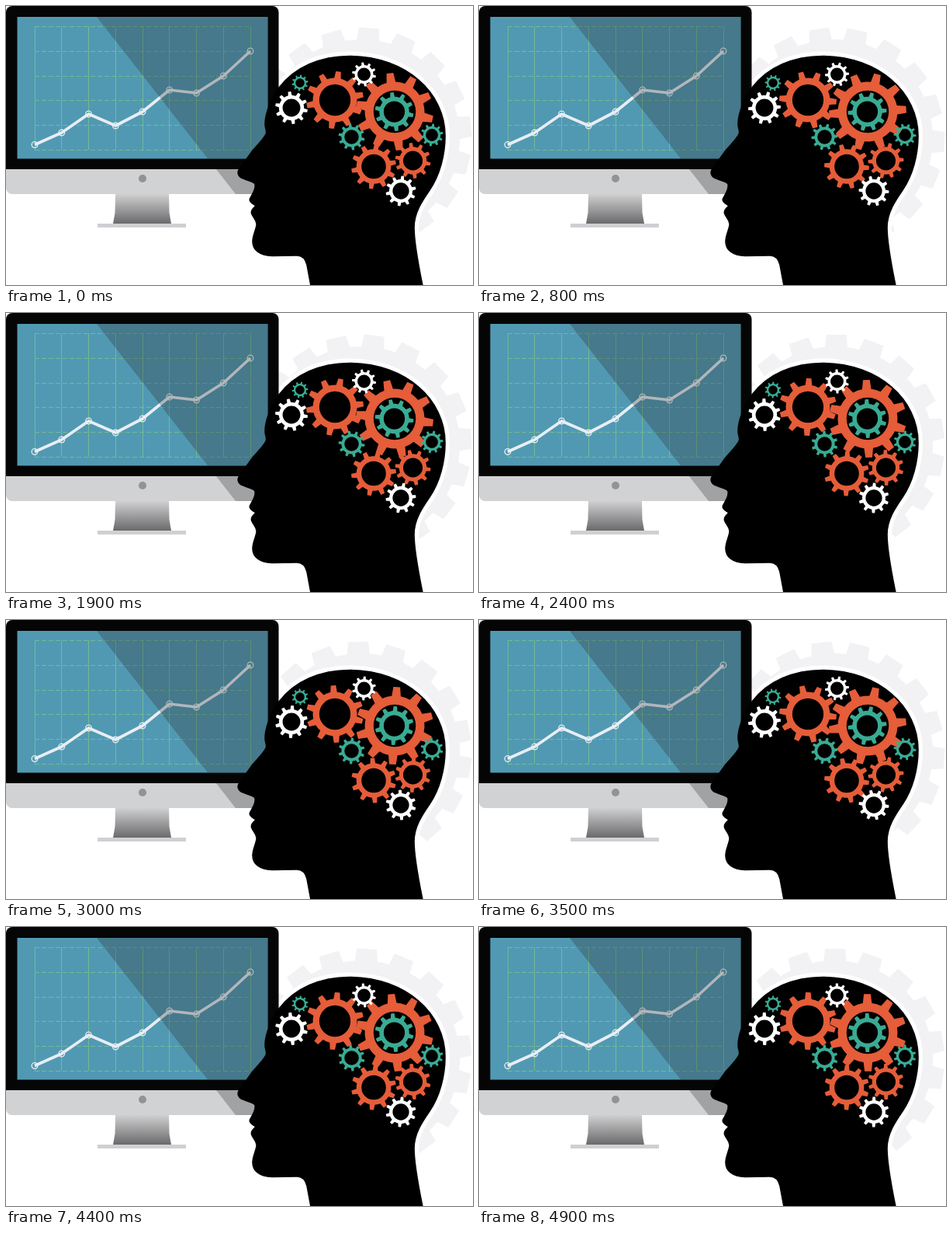
These frames come from a looping animation (602x359 px, 5 s). An HTML page with a canvas:

```html
<!DOCTYPE html>
<html lang="en">
<head>
<meta charset="utf-8">
<title>Thinking gears</title>
<style>
html, body { margin: 0; width: 100%; height: 100%; overflow: hidden; background: #fff; }
canvas { display: block; }
</style>
</head>
<body>
<canvas id="stage" width="602" height="359"></canvas>
<script>
const ctx = document.getElementById('stage').getContext('2d');
const TICK = 100, TICKS = 50;
const RESTS = [12, 31, 37]; // ticks that repeat the pose before them
const PITCHES = 8;          // teeth passed per loop
const TAU = Math.PI * 2, DEG = TAU / 360;
const ORANGE = '#e55d39', TEAL = '#3aab93', WHITE = '#fff', PALE = '#f2f1f4';
const SCREEN = [14.5, 14, 323, 182.5];
const CHIN = [0, 210, 351.5, 32, [0, 0, 8, 8]];

// x, y, radius, colour, direction
const GEARS = [
  [424, 121, 37, ORANGE, 1],
  [501, 136, 50, ORANGE, -1],
  [500.5, 136, 25, TEAL, -1],
  [474, 206.5, 29, ORANGE, 1],
  [524.5, 199, 23, ORANGE, -1],
  [368, 131, 21, WHITE, -1],
  [461.5, 88, 15.5, WHITE, -1],
  [379, 99, 10.5, TEAL, 1],
  [445.5, 168.5, 17, TEAL, -1],
  [549, 166, 14.5, TEAL, 1],
  [509, 238, 19.5, WHITE, 1]
];

const HEIGHTS = [178.5, 163, 139, 154, 136, 108, 112, 90, 58];
const column = i => 37 + i * 34.75;

const head = new Path2D(`M445 64.5 C405 64 372 79 352 105 C341 120 334 139 334 152
  C334 158 337 161 335 165 C332 171 325 178 318 186 L301 209.5
  C297 215 300 220 306 222 C312 225 319 226 321 229
  C322 235 319 240 315 247 C313 250 315 253 322 257
  C318 261 315 264 317 268 C319 273 324 276 323 282
  C322 289 318 295 318 303 C318 314 327 321 343 321.5
  L373 321 C382 320 386 325 388 333 L393 360 L537 360
  C532 335 526 306 526 285 C526 266 537 250 546 237
  C559 218 566 192 566 167 C566 111 515 65.5 445 64.5 Z`);

// Steady turning with one slow swell over the loop
function travel(tick) {
  const part = tick / TICKS;
  return PITCHES * part + 0.14 * Math.sin(TAU * part);
}

function gearPath(x, y, tip, root, turn, teeth, wide, narrow) {
  const pitch = TAU / teeth;
  const at = (r, a) => ctx.lineTo(x + r * Math.sin(a), y - r * Math.cos(a));
  ctx.beginPath();
  for (let i = 0; i < teeth; i++) {
    const a = turn + i * pitch;
    at(root, a - wide * pitch);
    at(tip, a - narrow * pitch);
    at(tip, a + narrow * pitch);
    at(root, a + wide * pitch);
    at(root, a + pitch / 2);
  }
  ctx.closePath();
}

function drawGear([x, y, r, color, dir], move) {
  gearPath(x, y, r, r * 0.77, dir * (7 + 36 * move) * DEG, 10, 0.24, 0.14);
  const hole = r * 0.545;
  ctx.moveTo(x + hole, y);
  ctx.arc(x, y, hole, 0, TAU);
  ctx.fillStyle = color;
  ctx.fill('evenodd');
}

function fillShape(color, points) {
  ctx.beginPath();
  points.forEach(p => ctx.lineTo(p[0], p[1]));
  ctx.closePath();
  ctx.fillStyle = color;
  ctx.fill();
}

function fillRound(color, ...box) {
  ctx.beginPath();
  ctx.roundRect(...box);
  ctx.fillStyle = color;
  ctx.fill();
}

function strokeLine(x1, y1, x2, y2) {
  ctx.beginPath();
  ctx.moveTo(x1, y1);
  ctx.lineTo(x2, y2);
  ctx.stroke();
}

function drawChart() {
  ctx.strokeStyle = '#73ba94';
  ctx.lineWidth = 1;
  for (let i = 0; i < 9; i++) {
    const x = Math.floor(column(i)) + 0.5;
    strokeLine(x, 26, x, 185);
  }
  ctx.setLineDash([6, 3]);
  for (let i = 0; i < 6; i++) {
    const y = Math.round(26 + i * 31.8) + 0.5;
    strokeLine(37, y, 315, y);
  }
  ctx.setLineDash([]);

  ctx.strokeStyle = '#e8eef5';
  ctx.lineWidth = 3.7;
  ctx.lineJoin = 'round';
  ctx.beginPath();
  HEIGHTS.forEach((y, i) => ctx.lineTo(column(i), y));
  ctx.stroke();
  ctx.lineWidth = 1.3;
  HEIGHTS.forEach((y, i) => {
    ctx.beginPath();
    ctx.arc(column(i), y, 3.8, 0, TAU);
    ctx.stroke();
  });
}

function drawMonitor() {
  const metal = ctx.createLinearGradient(0, 242, 0, 280);
  metal.addColorStop(0, '#d0d0d1');
  metal.addColorStop(1, '#6a6a6c');
  fillShape(metal, [[141, 242], [210, 242], [210.5, 266], [213, 280], [138, 280], [140.5, 266]]);
  ctx.fillStyle = '#cfd0d2';
  ctx.fillRect(118, 280, 114, 5);

  fillRound('#050506', 0, 0, 351.5, 211, [8, 8, 0, 0]);
  fillRound('#d1d2d4', ...CHIN);
  ctx.fillStyle = '#5199b2';
  ctx.fillRect(...SCREEN);
  drawChart();
  fillRound('#929396', 171, 217, 10, 10, 5);

  // Slanted shade over the screen and chin
  ctx.save();
  ctx.beginPath();
  ctx.rect(...SCREEN);
  ctx.roundRect(...CHIN);
  ctx.clip();
  fillShape('rgba(36,36,36,.28)', [[106, 0], [352, 0], [352, 242], [296, 242]]);
  ctx.restore();
}

function drawHead() {
  ctx.fillStyle = ctx.strokeStyle = '#000';
  ctx.lineWidth = 1.6;
  ctx.fill(head);
  ctx.stroke(head);
}

function draw(ms) {
  let tick = Math.floor(ms / TICK) % TICKS;
  if (RESTS.includes(tick)) tick--;
  const move = travel(tick);

  ctx.fillStyle = WHITE;
  ctx.fillRect(0, 0, 602, 359);
  gearPath(458, 170, 142.5, 127, (4 + 20 * move) * DEG, 18, 0.33, 0.26);
  ctx.fillStyle = PALE;
  ctx.fill();
  ctx.strokeStyle = WHITE;
  ctx.lineWidth = 12;
  ctx.stroke(head);
  drawMonitor();
  drawHead();
  GEARS.forEach(gear => drawGear(gear, move));
}

function loop() {
  draw(performance.now() + 20); // small lead covers display delay
  requestAnimationFrame(loop);
}
loop();
</script>
</body>
</html>
```
